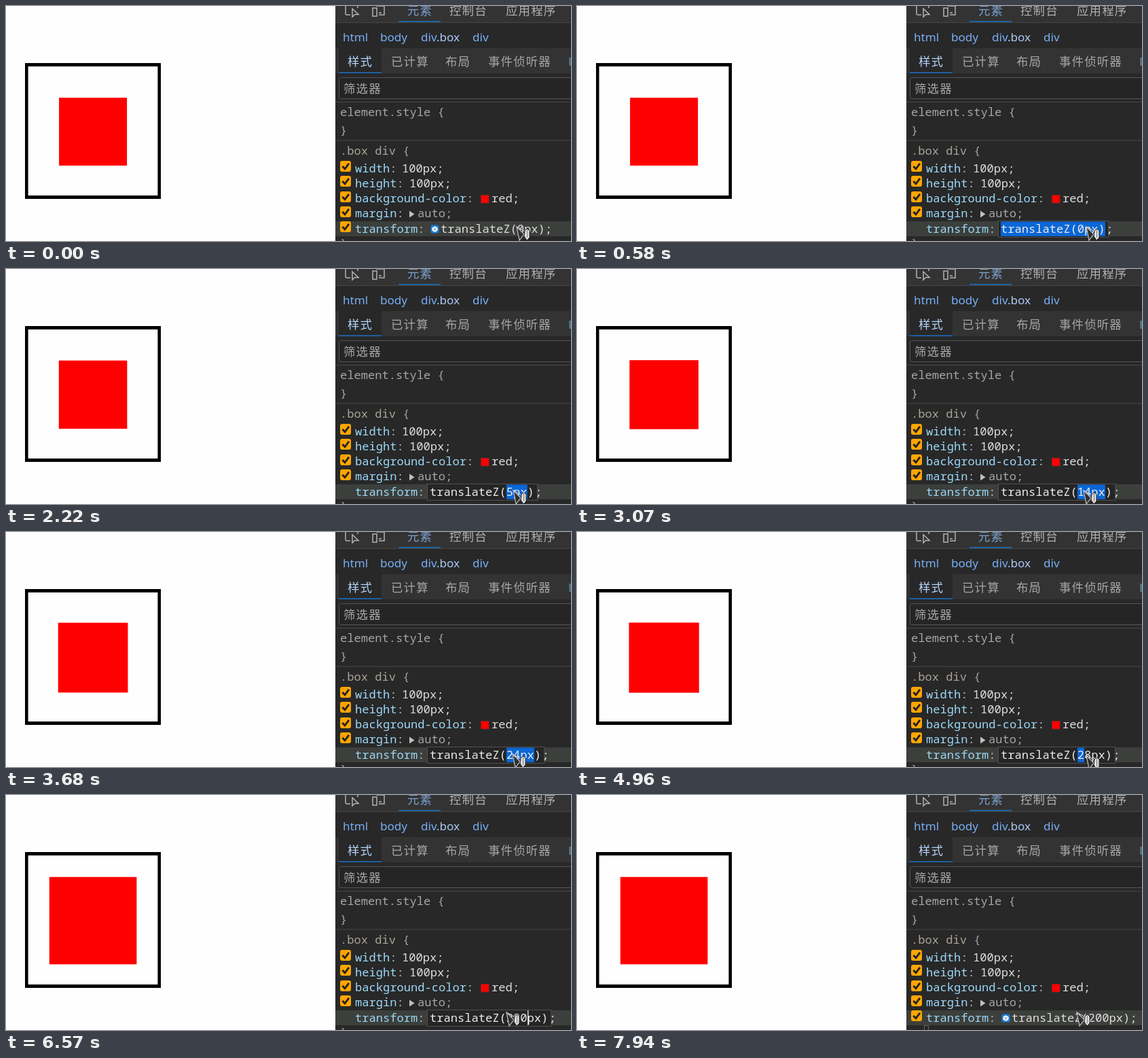
An HTML page for the animation above (8000 ms loop, 832 by 346 pixels).

```html
<!DOCTYPE html>
<html lang="zh">
<head>
<meta charset="utf-8">
<style>
html, body { margin: 0; width: 100%; height: 100%; overflow: hidden; background: #fefefe; }
svg { display: block; width: 832px; height: 346px; }
text { white-space: pre; }
.mono { font: 500 17.1px "Noto Sans Mono", "DejaVu Sans Mono", monospace; }
.ui { font: 17.1px "Noto Sans", "Open Sans", sans-serif; }
.cjk { font: 17.4px "Noto Sans CJK SC", "Noto Sans CJK", sans-serif; letter-spacing: 1.2px; }
</style>
</head>
<body>
<svg id="stage" viewBox="0 0 832 346" xmlns="http://www.w3.org/2000/svg"></svg>
<script>
const LOOP = 8000, CHAR = 10.26, PERSPECTIVE = 900, ROW = 22.3;
const PROP = '#9cd8f8', VALUE = '#dedede', GREY = '#a6a6a6', BLUE = '#78aef5', DARK = '#282828';
const stage = document.getElementById('stage');

function set(node, attrs) {
  for (const key in attrs) node.setAttribute(key, attrs[key]);
}
function add(tag, attrs, parent = stage, content = '') {
  const node = document.createElementNS('http://www.w3.org/2000/svg', tag);
  set(node, attrs);
  node.textContent = content;
  return parent.appendChild(node);
}
const rect = (x, y, width, height, fill, parent, more) =>
  add('rect', { x, y, width, height, fill, ...more }, parent);
const label = (x, y, content, fill, kind = 'mono', parent) =>
  add('text', { x, y, fill, class: kind }, parent, content);
const path = (d, attrs, parent) => add('path', { d, fill: 'none', ...attrs }, parent);
const show = (node, on) => node.style.display = on ? '' : 'none';

function checkbox(baseline, parent) {
  const y = Math.round(baseline - 16.5);
  rect(492, y, 16, 16, '#ffa500', parent, { rx: 3 });
  path(`M495.3 ${y + 8}l3.7 3.8 6-8`, { stroke: '#222', 'stroke-width': 2.8 }, parent);
}
function property(y, name) {
  label(514, y, name, PROP);
  label(514 + name.length * CHAR, y, ':', '#b8c4c8');
}

// Page with the square
rect(28, 84, 200, 200, '#000');
rect(32.6, 89, 190.8, 190, '#fefefe');
const square = rect(78, 135, 100, 100, '#f00');

// Panel backgrounds
rect(485, 0, 347, 346, DARK);
rect(485, 0, 347, 24, '#333');
rect(485, 24, 347, 1, '#444');
rect(485, 62, 347, 37, '#333');
rect(490, 62, 63, 37, DARK);
rect(578, 22, 62, 1.5, '#1a70c8');
rect(490, 97.5, 63, 1.5, '#1a70c8');
rect(490.5, 105.5, 350, 31, '#252525', stage, { rx: 3, stroke: '#555' });
rect(485, 141, 347, 1, '#484848');
rect(485, 197.5, 347, 1, '#484848');

// Toolbar icons
const line = { stroke: '#b4b4b4', 'stroke-width': 1.5 };
path('M500 0V11Q500 13 502 13H507M518 0V3M510 4V16L513.5 12.5H519Z', line);
path('M540 3H546V15H540ZM545 0H557V13H549M549 10H553', line);

// Tabs, breadcrumbs and filter
label(591, 13, '元素', '#7c9fcd', 'cjk');
label(653, 13, '控制台', '#b0b0b0', 'cjk');
label(736, 13, '应用程序', '#b0b0b0', 'cjk');
label(496, 52, 'html', BLUE, 'ui');
label(551, 52, 'body', BLUE, 'ui');
add('tspan', { fill: '#a9c9f5' }, label(611, 52, 'div', BLUE, 'ui'), '.box');
label(687, 52, 'div', BLUE, 'ui');
label(503, 87.5, '样式', '#b5d3fa', 'cjk');
label(567, 87.5, '已计算', GREY, 'cjk');
label(647, 87.5, '布局', GREY, 'cjk');
label(710, 87.5, '事件侦听器', GREY, 'cjk');
rect(829.5, 76, 2, 12, '#5f8c9e');
label(497, 127.5, '筛选器', GREY, 'cjk');

// Rules
const rowY = i => 244.5 + i * ROW, lastY = rowY(4);
label(492, 161.5, 'element.style {', GREY);
label(492, 188.5, '}', GREY);
label(492, 218.5, '.box div {', '#aaa398');
rect(485, 317, 347, 22, '#3c3f3b');
['width', 'height', 'background-color', 'margin', 'transform'].forEach((name, i) => {
  property(rowY(i), name);
  if (name !== 'transform') checkbox(rowY(i));
});
label(583, rowY(0), '100px;', VALUE);
label(594, rowY(1), '100px;', VALUE);
rect(699.5, 278.5, 11.5, 11.5, '#f00', stage, { stroke: '#8a2020' });
label(715, rowY(2), 'red;', VALUE);
path('M594 301.5L601.5 306.5L594 311.5Z', { fill: '#c0c0c0' });
label(606, rowY(3), 'auto;', GREY);

// Value as shown
const shown = add('g', {});
checkbox(lastY, shown);
rect(625.5, 322.5, 12, 12, '#1a7ad9', shown, { rx: 2.5 });
path('M631.5 324.3L635.5 326.5V330.7L631.5 333L627.5 330.7V326.5Z', { fill: '#fff' }, shown);
path('M629.5 327.5L631.5 328.7L633.5 327.5M631.5 328.7V331', { stroke: '#1a7ad9' }, shown);
const shownText = label(640, lastY, '', VALUE, 'mono', shown);

// Value being edited
const editor = add('g', {});
const field = rect(620.5, 316.5, 162, 24, '#252525', editor, { stroke: '#505050' });
const selection = rect(0, 317.5, 0, 21.5, '#0b67d6', editor);
const editText = label(624, lastY, '', '#ececec', 'mono', editor);
const semicolon = label(0, lastY, ';', VALUE, 'mono', editor);
const caret = rect(0, 317, 1.2, 22, '#f0f0f0', editor);

const brace = label(492, 355, '}', GREY);
const newField = rect(511.5, 339.5, 6, 20, '#252525', stage, { stroke: '#666' });

// Mouse pointer, tip at its own zero
const pointer = add('g', {});
path('M0 0L4 20L11 11Z', { fill: '#303030', stroke: '#c4c4c4', 'stroke-width': 1.2 }, pointer);
path('M0 0L12 7', { stroke: '#c4c4c4', 'stroke-width': 1.2 }, pointer);
path('M12 6Q15.5 1 19 6V16L15 20L11 14Z', { fill: '#dedede', stroke: '#222' }, pointer);
path('M15.5 5V16', { stroke: '#777' }, pointer);

// Moments of the edit
const OPEN = 460, PLACE = 950, PICK = 1530, CLICK = 4380, DRAG = 4960, DRAG_END = 5190;
const TYPED = [5990, 6450, 6570], COMMIT = 7140;
const FIRST = 'translateZ('.length;

// Key points: [time, ...values]
const COUNT = [[1640, 0], [2220, 5], [2560, 5], [3680, 24], [4000, 28]];
const MOVES = [[0, 752, 325], [1300, 748, 325], [4200, 745, 327], [4600, 738, 329],
  [4960, 750, 329], [5310, 757, 328], [5990, 738, 320], [7900, 736, 320]];

function along(points, t) {
  const next = points.findIndex(p => p[0] > t);
  if (next <= 0) return points.at(next).slice(1);
  const [a, b] = points.slice(next - 1, next + 1);
  const u = (t - a[0]) / (b[0] - a[0]);
  return a.slice(1).map((v, i) => v + (b[i + 1] - v) * u);
}

function pixels(t) {
  const digits = TYPED.filter(time => t >= time).length;
  return digits ? '200'.slice(0, digits) : String(Math.round(along(COUNT, t)[0]));
}

function selected(t, px) {
  const end = FIRST + px.length;
  if (t < PLACE) return [0, end + 3];
  if (t < PICK) return [end + 1, end + 1];
  if (t < CLICK) return [FIRST, end + 2];
  if (t < DRAG) return [FIRST, FIRST];
  if (t < DRAG_END) return [FIRST, FIRST + 1];
  return [t < TYPED[0] ? FIRST : end, end];
}

function draw(t) {
  const px = pixels(t), value = `translateZ(${px}px)`;
  const editing = t >= OPEN && t < COMMIT;
  const size = 100 * PERSPECTIVE / (PERSPECTIVE - px);
  set(square, { x: 128.1 - size / 2, y: 185 - size / 2, width: size, height: size });

  show(shown, !editing);
  show(editor, editing);
  shownText.textContent = value + ';';
  if (editing) {
    const [from, to] = selected(t, px), width = value.length * CHAR;
    editText.textContent = value;
    set(field, { width: width + 8 });
    set(semicolon, { x: 625 + width });
    set(selection, { x: 624 + from * CHAR, width: (to - from) * CHAR });
    set(caret, { x: 624.5 + from * CHAR });
    show(caret, from === to);
  }
  show(brace, t < COMMIT);
  show(newField, t >= COMMIT);
  set(pointer, { transform: `translate(${along(MOVES, t).map(Math.round)})` });
}

const start = performance.now();
function tick() {
  draw((performance.now() - start) % LOOP);
  requestAnimationFrame(tick);
}
tick();
</script>
</body>
</html>
```
